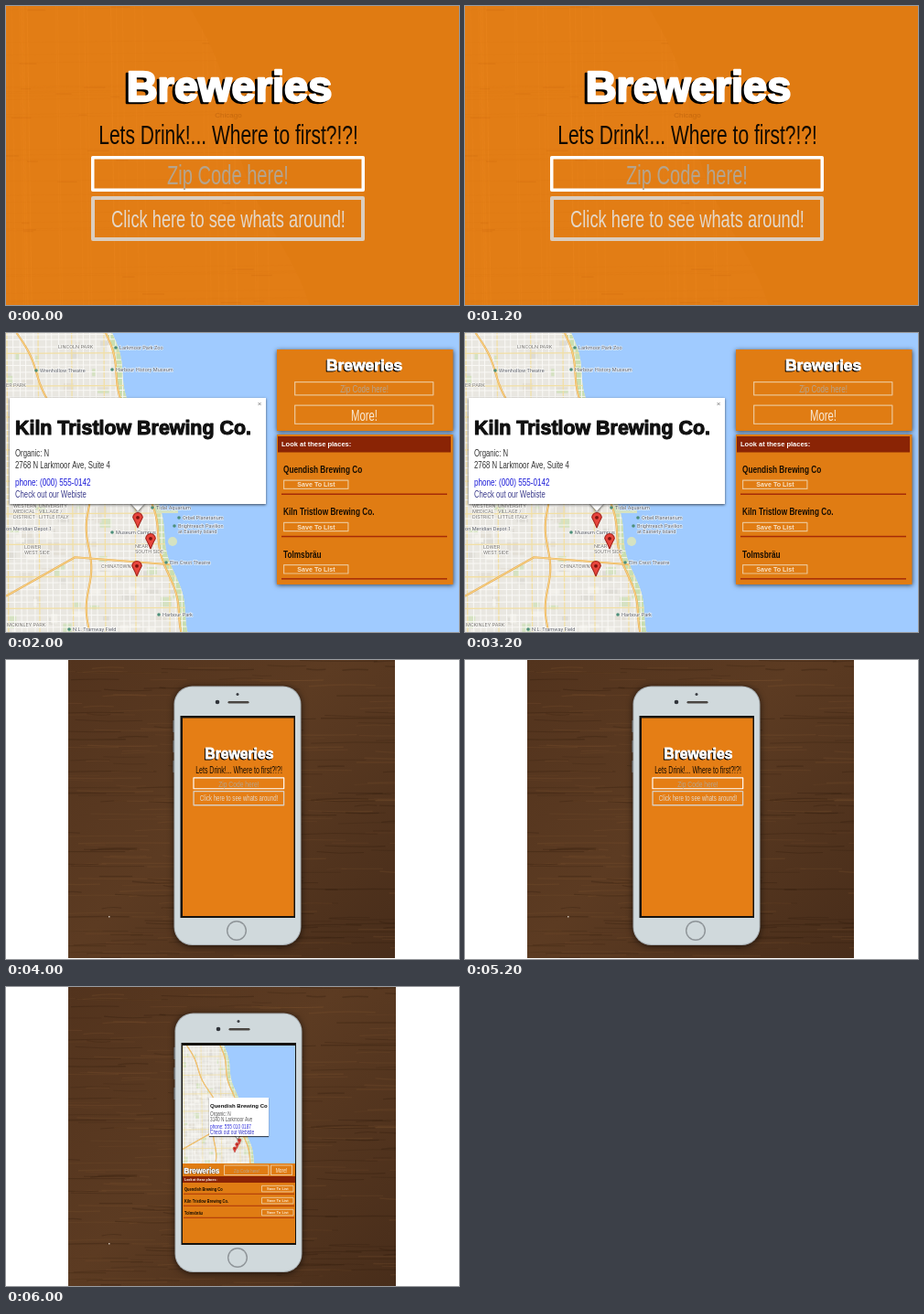
These frames come from a looping animation (495x327 px, 8000 ms). An HTML page with a canvas:

```html
<!DOCTYPE html>
<html lang="en">
<head>
<meta charset="utf-8">
<title>Breweries</title>
<style>
html, body { margin: 0; width: 100%; height: 100%; overflow: hidden; background: #fff; }
canvas { display: block; width: 495px; height: 327px; }
</style>
</head>
<body>
<canvas id="stage" width="495" height="327"></canvas>
<script>
const ctx = document.getElementById('stage').getContext('2d');
const W = 495, H = 327, HOLD = 2000;
const SANS = '"Liberation Sans", Arial, sans-serif';
const CONDENSED = 0.7;
const ORANGE = '#e07c13', RED = '#8a2405', RULE = '#a52b08', LAKE = '#a0cbff', PALE = '#ecc391', HINT = '#b5a48e';
const BODY = '#d0d9dc';
const NAMES = ['Quendish Brewing Co', 'Kiln Tristlow Brewing Co.', 'Tolmsbräu'];

let seed = 1;
const rnd = () => (seed = seed * 16807 % 2147483647) / 2147483647;

function repeat(count, draw) {
  for (let i = 0; i < count; i++) draw(i);
}

function rect(x, y, w, h, color) {
  ctx.fillStyle = color;
  ctx.fillRect(x, y, w, h);
}

// Border drawn inside the given box
function frame(x, y, w, h, line, color) {
  ctx.strokeStyle = color;
  ctx.lineWidth = line;
  ctx.strokeRect(x + line / 2, y + line / 2, w - line, h - line);
}

function stroke(points, color, width) {
  ctx.beginPath();
  points.forEach(p => ctx.lineTo(...p));
  ctx.strokeStyle = color;
  ctx.lineWidth = width;
  ctx.stroke();
}

function fill(points, color) {
  ctx.beginPath();
  points.forEach(p => ctx.lineTo(...p));
  ctx.fillStyle = color;
  ctx.fill();
}

function dot(x, y, r, color) {
  ctx.fillStyle = color;
  ctx.beginPath();
  ctx.arc(x, y, r, 0, Math.PI * 2);
  ctx.fill();
}

function pill(x, y, w, h, r, color) {
  ctx.fillStyle = color;
  ctx.beginPath();
  ctx.roundRect(x, y, w, h, r);
  ctx.fill();
}

function text(str, x, y, size, color, align = 'left', style = '') {
  ctx.font = `${style} ${size}px ${SANS}`;
  ctx.textAlign = align;
  ctx.fillStyle = color;
  ctx.fillText(str, x, y);
}

function slim(str, x, y, size, color, align, style) {
  ctx.save();
  ctx.translate(x, y);
  ctx.scale(CONDENSED, 1);
  text(str, 0, 0, size, color, align, style);
  ctx.restore();
}

// Heavy display face with rounded corners
function display(str, x, y, size, color, align) {
  text(str, x, y, size, color, align, 'bold');
  ctx.strokeStyle = color;
  ctx.lineWidth = size * 0.05;
  ctx.lineJoin = 'round';
  ctx.strokeText(str, x, y);
}

function logo(x, y, size) {
  const d = size * 0.06;
  display('Breweries', x - d, y + d * 0.7, size, '#000', 'center');
  display('Breweries', x, y, size, '#fff', 'center');
}

function withShadow(blur, draw) {
  ctx.save();
  ctx.shadowColor = 'rgba(0,0,0,.65)';
  ctx.shadowBlur = blur;
  ctx.shadowOffsetY = 1;
  draw();
  ctx.restore();
}

function pin(x, y, s) {
  const r = s * 0.33, top = y - s * 0.7;
  ctx.fillStyle = '#e8453c';
  ctx.strokeStyle = '#a3231c';
  ctx.lineWidth = s * 0.07;
  ctx.beginPath();
  ctx.moveTo(x, y);
  ctx.quadraticCurveTo(x - r * 0.4, y - r, x - r, top);
  ctx.arc(x, top, r, Math.PI, 0);
  ctx.quadraticCurveTo(x + r * 0.4, y - r, x, y);
  ctx.fill();
  ctx.stroke();
  dot(x, top, s * 0.12, '#7a130e');
}

// Speech box with a small tail below
function bubble(x, y, w, h, tip, size) {
  withShadow(size / 3, () => {
    fill([[tip - size, y + h - 1], [tip, y + h + size], [tip + size, y + h - 1]], '#fff');
    rect(x, y, w, h, '#fff');
  });
}

// Points of a line running down the map beside the shore
function shore(from, y, h, slope, wave) {
  const points = [];
  for (let d = 0; d <= h; d += 3) points.push([from + slope * d + wave * Math.sin(d / (wave * 5)), y + d]);
  return points;
}

function streetMap(x, y, w, h, from, step) {
  const wave = step * 0.4, slope = 0.26;
  const coast = shore(from, y, h, slope, wave);
  const east = from + slope * h + wave;
  const land = [[x, y], ...coast, [x, y + h]];
  ctx.save();
  ctx.beginPath();
  ctx.rect(x, y, w, h);
  ctx.clip();
  rect(x, y, w, h, LAKE);
  fill(land, '#e9e7e1');
  ctx.clip();
  seed = 77;
  repeat(170, i => rect(x + rnd() * (east - x), y + rnd() * h, step * (0.5 + rnd() * 1.6), step * (0.5 + rnd()),
    ['#dedcd6', '#e3dfd6', '#d5e2c2', '#f2f0ea'][i % 4]));
  stroke(coast, '#c9deb0', step * 1.8);

  const street = i => i % 5 ? ['#faf9f6', step * 0.14] : ['#f2dfa4', step * 0.18];
  repeat((east - x) / step, i => {
    const sx = x + (i + rnd() * 0.3) * step;
    stroke([[sx, y], [sx + 2, y + h]], ...street(i));
  });
  repeat(h / step, i => {
    const sy = y + (i + rnd() * 0.3) * step;
    stroke([[x, sy], [east, sy - 1]], ...street(i + 2));
  });

  const span = from - x;
  const roads = [
    shore(from - step, y, h, slope, wave),
    shore(x + span * 0.1, y, h * 0.45, span / h * 1.4, wave),
    shore(x + span * 0.78, y + h * 0.45, h * 0.55, 0, wave),
    [[x, y + h * 0.88], [x + span * 0.65, y + h * 0.75], [east, y + h * 0.78]]
  ];
  for (const road of roads) {
    stroke(road, '#e3a94f', step * 0.3);
    stroke(road, '#f9d083', step * 0.18);
  }
  ctx.restore();
}

// Small map caption, one line per array entry
function label(lines, x, y, color) {
  ctx.font = `5.6px Roboto, ${SANS}`;
  ctx.textAlign = 'left';
  ctx.lineJoin = 'round';
  ctx.strokeStyle = 'rgba(255,255,255,.7)';
  ctx.lineWidth = 1.4;
  ctx.fillStyle = color;
  lines.forEach((line, i) => {
    ctx.strokeText(line, x, y + i * 6);
    ctx.fillText(line, x, y + i * 6);
  });
}

function district(str, x, y) {
  label(str.split('|'), x, y, '#77746f');
}

function sight(str, x, y) {
  label(str.split('|'), x, y, '#5d6068');
  dot(x - 4, y - 2, 1.8, '#4d8f7b');
}

function form() {
  logo(244, 104, 47);
  slim('Lets Drink!... Where to first?!?!', 243, 151, 30, '#120a02', 'center');
  frame(93, 164, 299, 39, 3.5, '#fff');
  slim('Zip Code here!', 242.5, 195, 28.7, HINT, 'center');
  frame(93, 208, 299, 49, 4, '#dacdbf');
  slim('Click here to see whats around!', 243, 242, 26.1, '#e4d8ca', 'center');
}

function landing() {
  rect(0, 0, W, H, '#e07b12');
  ctx.save();
  fill([[0, 0], ...shore(200, 0, H, 0.38, 8), [0, H]], '#e27d15');
  ctx.clip();
  seed = 19;
  repeat(30, () => {
    const x = rnd() * 300, y = rnd() * H;
    stroke([[0, y], [W, y - 6]], 'rgba(196,98,8,.1)', 0.8);
    stroke([[x, 0], [x + 5, H]], 'rgba(245,150,50,.1)', 0.8);
    rect(x, y, 8 + rnd() * 16, 1.5, 'rgba(185,86,0,.14)');
  });
  ctx.restore();
  text('Chicago', 243, 122, 8, 'rgba(150,70,0,.35)', 'center');
  form();
}

function results() {
  streetMap(0, 0, W, H, 116, 7);
  dot(182, 228, 5, '#d5e2c2');
  rect(164, 194, 24, 3, '#d5e2c2');

  district('LINCOLN PARK', 57, 17);
  district('ER PARK', 0, 59);
  district('WESTERN|MEDICAL|DISTRICT', 8, 191);
  district('UNIVERSITY|VILLAGE /|LITTLE ITALY', 36, 191);
  district('LOWER|WEST SIDE', 20, 236);
  district('NEAR|SOUTH SIDE', 141, 235);
  district('CHINATOWN', 104, 257);
  district('MCKINLEY PARK', 1, 321);
  sight('Larkmoor Park Zoo', 124, 18);
  sight('Wrenhollow Theatre', 37, 43);
  sight('Harbour History Museum', 120, 42);
  sight('on Meridian Depot 1', 0, 216);
  sight('Tidal Aquarium', 164, 193);
  sight('Orbel Planetarium', 193, 204);
  sight('Brightreach Pavilion|at Easterly Island', 188, 213);
  sight('Museum Campus', 120, 220);
  sight('Elm Crest Theatre', 179, 253);
  sight('Harbour Park', 171, 310);
  sight('N.L. Tramway Field', 73, 326);

  pin(144, 213, 16);
  pin(158, 236, 16);
  pin(143, 266, 16);

  bubble(4, 71, 280, 116, 144, 8);
  text('×', 277, 80, 8, '#777', 'center');
  display(NAMES[1], 10, 111, 21.4, '#111');
  slim('Organic: N', 10, 135, 11.1, '#333');
  slim('2768 N Larkmoor Ave, Suite 4', 10, 147.5, 11.1, '#333');
  slim('phone: (000) 555-0142', 10, 166.5, 11.6, '#1a1ad8');
  slim('Check out our Webiste', 10, 179.5, 11, '#3c3c8c');

  withShadow(5, () => {
    rect(296, 18, 192.5, 89, ORANGE);
    rect(296, 111, 192.5, 164, ORANGE);
  });
  logo(391.5, 41, 17.4);
  frame(315, 53, 152.5, 15.5, 1.3, PALE);
  slim('Zip Code here!', 391.5, 65, 11.4, HINT, 'center');
  frame(315, 78.5, 152.5, 21.5, 1.3, PALE);
  slim('More!', 391.5, 95.5, 16.2, '#f8ead8', 'center');
  rect(297, 113, 189, 17.5, RED);
  text('Look at these places:', 301, 124.3, 7.5, '#fff', 'left', 'bold');
  NAMES.forEach((name, i) => {
    const y = 153 + i * 46.3;
    slim(name, 303, y, 11.8, '#150c02', 'left', 'bold');
    frame(303, y + 7.5, 71.5, 10.5, 1.2, PALE);
    text('Save To List', 339, y + 15.3, 7.1, '#f7e3c8', 'center', 'bold');
    rect(301, y + 22.5, 181, 1.5, RULE);
  });
}

function table(right, bottom) {
  const w = right - 68;
  const wood = ctx.createLinearGradient(68, 0, right, bottom);
  wood.addColorStop(0, '#52331d');
  wood.addColorStop(0.45, '#5c3b22');
  wood.addColorStop(1, '#482d1a');
  ctx.save();
  ctx.beginPath();
  ctx.rect(68, 0, w, bottom);
  ctx.clip();
  rect(68, 0, w, bottom, wood);
  seed = 41;
  repeat(300, i => {
    const x = 40 + rnd() * 380, y = rnd() * H, len = 20 + rnd() * 90, bend = rnd() * 6 - 3;
    ctx.beginPath();
    ctx.moveTo(x, y);
    ctx.quadraticCurveTo(x + len / 2, y + bend, x + len, y + bend / 3);
    ctx.strokeStyle = i % 2 ? 'rgba(36,20,8,.24)' : 'rgba(136,92,54,.2)';
    ctx.lineWidth = 0.5 + rnd();
    ctx.stroke();
  });
  rect(112, 280, 1.5, 1.5, '#cdbfb2');
  ctx.restore();
}

function phone(right, bottom, dx) {
  rect(0, 0, W, H, '#fff');
  table(right, bottom);
  ctx.save();
  ctx.translate(dx, 0);
  repeat(3, i => rect(182.5, 66 + i * 22, 2, 13, '#8d9296'));
  withShadow(7, () => pill(183.5, 28.5, 139, 283.5, 20, '#a9b0b4'));
  pill(184.5, 29.5, 137, 281.5, 19, BODY);
  dot(253, 37.5, 1.5, '#3a3d42');
  dot(231, 46, 2.3, '#30343a');
  pill(242.5, 45, 23, 2.6, 1.3, '#4a4642');
  dot(252, 296, 11, '#8e9498');
  dot(252, 296, 9.6, BODY);
  rect(190.5, 61, 125.5, 221, '#15130f');
  ctx.restore();
}

function phoneLanding() {
  phone(425, 326, 0);
  rect(193, 63.5, 121.5, 216.5, '#e57e15');
  ctx.save();
  ctx.translate(254.5, 124);
  ctx.scale(0.334, 0.334);
  ctx.translate(-243, -151);
  form();
  ctx.restore();
}

function phoneResults() {
  phone(426, 327, 1);
  streetMap(193, 64, 123, 129, 238, 4);
  repeat(3, i => pin(250 + i * 2.5, 181 - i * 4.5, 6));
  bubble(222, 121, 65, 42, 253, 3);
  text(NAMES[0], 223, 131.5, 6, '#111', 'left', 'bold');
  slim('Organic: N', 223, 141, 6.8, '#555');
  slim('3140 N Larkmoor Ave', 223, 147, 6.8, '#555');
  slim('phone: 555 010 0187', 223, 155, 6.8, '#3434dd');
  slim('Check out our Webiste', 223, 161, 6.8, '#3434c8');

  rect(193, 193, 123, 87, ORANGE);
  logo(213.8, 203.5, 8.2);
  frame(238, 194.5, 49.5, 11.5, 1.1, PALE);
  slim('Zip Code here!', 263, 202.5, 6, HINT, 'center');
  frame(289, 194.5, 24, 11.5, 1.1, PALE);
  slim('More!', 301, 203, 7, '#f8e9d5', 'center');
  rect(193, 207, 123, 7, RED);
  text('Look at these places:', 195, 212, 3.5, '#fff', 'left', 'bold');
  NAMES.forEach((name, i) => {
    const y = 223 + i * 13;
    slim(name, 195, y, 5.7, '#150c02', 'left', 'bold');
    frame(279, y - 6.2, 35.5, 7.6, 1, PALE);
    text('Save To List', 296.8, y - 1, 4.1, '#fbe9d2', 'center', 'bold');
    rect(194, y + 2.8, 121, 0.9, RULE);
  });
}

const scenes = [landing, results, phoneLanding, phoneResults];
let shown = -1;

function tick(now) {
  const index = Math.floor(now / HOLD) % scenes.length;
  if (index !== shown) {
    scenes[index]();
    shown = index;
  }
  requestAnimationFrame(tick);
}
tick(performance.now());
</script>
</body>
</html>
```
